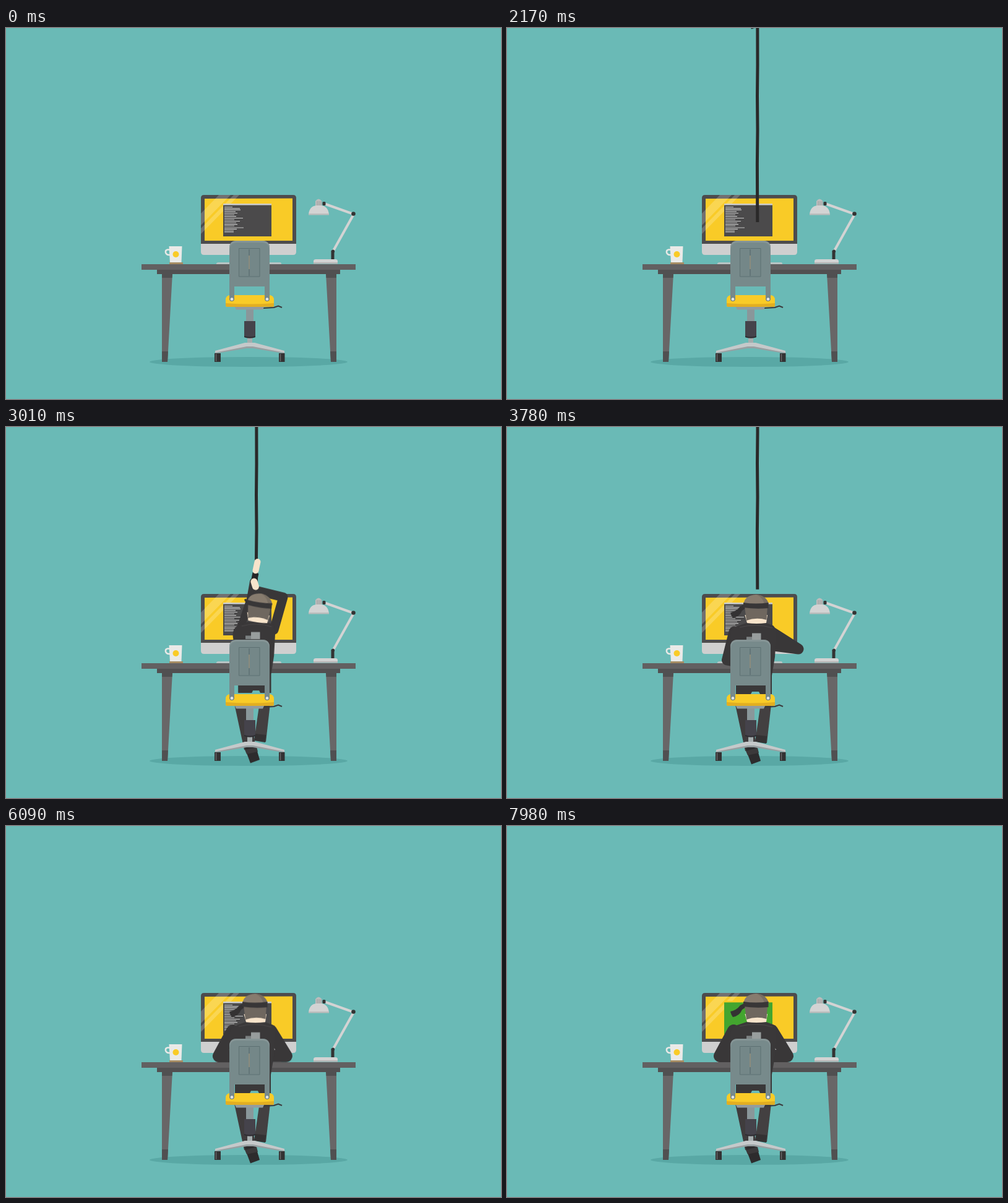
Write an HTML page without scripts that moves like this. It is 800 px wide and 600 px high and loops after 8000 ms.

```html
<!DOCTYPE html>
<html lang="en">
<head>
<meta charset="utf-8">
<title>Desk visitor</title>
<style>
html, body { margin: 0; width: 100%; height: 100%; overflow: hidden; background: #6abab6; }
svg { display: block; width: 100vw; height: 100vh; }

.rope, .ninja, .upper, .torso, .head, .tail, .arm, .hand, .cuff, .done { animation: 8s linear infinite; }
.limb { fill: none; stroke-linecap: round; stroke-linejoin: round; }
.arm { stroke: #393738; stroke-width: 20; }
.hand { stroke: #f8e4cb; }

.rope { animation-name: rope; transform-origin: 404px 0; }
@keyframes rope {
  0%, 6.3% { transform: translateY(-325px); animation-timing-function: cubic-bezier(.3, .2, .4, 1); }
  11% { transform: translateY(-80px) rotate(-1.8deg); animation-timing-function: ease-out; }
  14% { transform: translateY(-8px) rotate(.3deg); }
  17.5%, 45.5% { transform: none; animation-timing-function: ease-in; }
  50.75%, 100% { transform: translateY(-325px); }
}

.ninja { animation-name: drop; }
@keyframes drop {
  0%, 27% { transform: translateY(-560px); }
  27.125% { transform: translateY(-544px); animation-timing-function: cubic-bezier(.3, .1, .4, 1); }
  37.625% { transform: translateY(-2px); animation-timing-function: ease-out; }
  39.8% { transform: translateY(5px); animation-timing-function: ease-in-out; }
  43%, 100% { transform: none; }
}

.upper { animation-name: bob; }
@keyframes bob {
  0%, 54%, 59.5%, 65%, 70.5%, 77%, 83%, 89%, 94%, 98%, 100% { transform: none; }
  56.5%, 62%, 68%, 74%, 80%, 86%, 96.2% { transform: translateY(.8px); }
}

.torso { animation-name: torso; transform-origin: 434px 0; }
@keyframes torso {
  0%, 38% { transform: scaleX(.92); animation-timing-function: ease-in-out; }
  45%, 100% { transform: none; }
}

.head { animation-name: head; transform-origin: 403px 312px; }
@keyframes head {
  0%, 38.5% { transform: translate(4px, 0) rotate(8deg); animation-timing-function: ease-in-out; }
  45%, 100% { transform: none; }
}

.tail { animation-name: tail; transform-origin: 384px 289px; }
@keyframes tail {
  0%, 37.6% { transform: rotate(80deg) scale(.3); animation-timing-function: ease-out; }
  42.5% { transform: rotate(-12deg); }
  46%, 62%, 75%, 88%, 100% { transform: none; }
  56%, 69%, 82%, 94% { transform: rotate(2deg); }
}

.arm.right { animation-name: arm-right; }
@keyframes arm-right {
  0%, 38% { d: path("M433 330L448 277L407 267"); stroke-width: 15px; animation-timing-function: ease-in-out; }
  44.5% { d: path("M427 331L477 344L432 342"); stroke-width: 17px; }
  47.25% { d: path("M427 331L471 359L432 354"); stroke-width: 17px; animation-timing-function: ease-in-out; }
  52%, 57%, 62%, 67%, 72%, 77%, 82%, 87%, 91% { d: path("M428 331L452 372L430 372"); stroke-width: 20px; }
  54.5%, 59.5%, 64.5%, 69.5%, 74.5%, 79.5%, 84.5% { d: path("M428 331L454.5 371L431 371"); stroke-width: 20px; }
  93.6% { d: path("M428 331L462 366L434 365"); stroke-width: 19px; animation-timing-function: ease-in; }
  96%, 100% { d: path("M428 331L453 372L430 372"); stroke-width: 20px; }
}

.arm.left { animation-name: arm-left; }
@keyframes arm-left {
  0%, 38% { d: path("M378 330L395 280L400 252"); stroke-width: 12px; animation-timing-function: ease-in-out; }
  44% { d: path("M368 331L358 358L368 368"); stroke-width: 17px; }
  47.25% { d: path("M367 331L355.5 377L366 379"); stroke-width: 17px; animation-timing-function: ease-in-out; }
  52%, 56%, 61%, 66%, 71%, 76%, 81%, 86%, 90%, 100% { d: path("M366 331L344 372L364 372"); stroke-width: 20px; }
  53.5%, 58.5%, 63.5%, 68.5%, 73.5%, 78.5%, 83.5% { d: path("M366 331L343 371.5L364 371"); stroke-width: 20px; }
}

.hand.right { animation-name: hand-right; stroke-width: 11px; }
@keyframes hand-right {
  0%, 38% { d: path("M401 252L403.5 260"); animation-timing-function: ease-in-out; }
  44.5%, 100% { d: path("M412 362L408 366"); }
}
.hand.left { animation-name: hand-left; stroke-width: 10px; }
@keyframes hand-left {
  0%, 38% { d: path("M403.5 234L406.5 220"); animation-timing-function: ease-in-out; }
  44%, 100% { d: path("M378 372L386 374"); }
}
.cuff { stroke: #252425; stroke-width: 10px; stroke-linecap: butt; animation-name: cuff; }
@keyframes cuff {
  0%, 38% { d: path("M401.5 248L403.5 238"); animation-timing-function: ease-in-out; }
  44%, 100% { d: path("M372 370L378 372"); }
}

.done { animation-name: done; animation-timing-function: step-end; }
@keyframes done {
  0% { opacity: 0; }
  96.25%, 100% { opacity: 1; }
}
</style>
</head>
<body>
<svg viewBox="0 0 800 600">
  <rect width="800" height="600" fill="#6abab6"/>
  <ellipse cx="392" cy="540" rx="160" ry="8" fill="#59a8a5"/>

  <g id="monitor">
    <path d="M315 346H469V362Q469 367 464 367H320Q315 367 315 362Z" fill="#cfcfcf"/>
    <path d="M315 349V275Q315 270 320 270H464Q469 270 469 275V349Z" fill="#4d4c4d"/>
    <path d="M321 276L463 275.5V344H321Z" fill="#f9cb27"/>
    <path d="M344 270H363L315 319V300ZM368 270H377L315 333V324Z" fill="#fff" opacity=".2"/>
    <rect x="351" y="284" width="78" height="53" fill="#4b4a4b"/>
    <path d="M351 285.3H429" stroke="#d0d0cc" stroke-width="2.4"/>
    <path d="M353 289.5h13M353 291.8h25M353 294.2h26M353 296.9h18M353 299.5h21M353 302h16M353 304.6h19M353 307.5h30M353 310h16M353 312.5h25M353 315h19M353 317.6h21M353 320h16M353 323h31M353 325.4h20M353 328h15M353 330h15" stroke="#c4c4c4" stroke-width="1.2"/>
    <g class="done">
      <rect x="351" y="283" width="78" height="3" fill="#f9cb27"/>
      <rect x="351" y="285.3" width="78" height="51.7" fill="#43a52f"/>
    </g>
  </g>

  <g id="lamp" fill="#d3d3d3">
    <path d="M514 284L562 301L528 362" fill="none" stroke="#d3d3d3" stroke-width="4"/>
    <rect x="525.5" y="360" width="5" height="15" fill="#333"/>
    <circle cx="528.5" cy="361" r="2.6" fill="#333"/>
    <circle cx="561.5" cy="300.5" r="3.3" fill="#333"/>
    <path d="M500 290V280Q505 273 510.5 280V290Z" fill="#bdbdbd"/>
    <path d="M503 280V287M506 280V287M509 280V287" stroke="#999"/>
    <rect x="511.5" y="281" width="5" height="6" rx="1.5" fill="#333"/>
    <path d="M489 302Q490 288 502 287H510Q521 289 522 302Z"/>
    <path d="M489 300H522V302.5H489Z" fill="#bcbcbc"/>
    <path d="M497 381V377Q497 374 501 374H532Q536 374 536 377V381Z"/>
    <path d="M497 379H536V381.5H497Z" fill="#b5b5b5"/>
  </g>

  <g id="mug">
    <path d="M265 358.5H261Q257.5 359 258 363Q259 367.5 265 367" fill="none" stroke="#e9e9e7" stroke-width="2.6"/>
    <path d="M263.5 353H284.5L283.5 379H265Z" fill="#eaeae8"/>
    <circle cx="274.5" cy="366" r="5" fill="#f9cb27"/>
    <rect x="264" y="379" width="22" height="3" fill="#a68c63"/>
  </g>

  <g id="desk">
    <path d="M340 382V380.5Q341 379 343 379H443Q445 379 445 382Z" fill="#b9c4c4"/>
    <path d="M252 397H269L261 540H252ZM517 397H534V540H525Z" fill="#686667"/>
    <path d="M252 397H269L268.5 404H252ZM517 397H534V404H517.5ZM252 523H262L261 540H252ZM524 523H534V540H525Z" fill="#505051"/>
    <path d="M244 390H540V398H244Z" fill="#515051"/>
    <path d="M219 382H565V391H219Z" fill="#626061"/>
  </g>

  <path class="rope" d="M404.8 -20L405 60L404.5 110L405 165L404.4 220L404.8 314" fill="none" stroke="#2a2929" stroke-width="5"/>

  <g class="ninja">
    <g id="legs">
      <path d="M411 440H428L420 511L401 508Z" fill="#434041"/>
      <path d="M403 498L420 500L419 512L401 509Z" fill="#343233"/>
      <path d="M367 440H391L404 522L385 524Z" fill="#3f3c3d"/>
      <path d="M385 519L403 516L410 540L395 545.5Z" fill="#2d2c2d"/>
      <path d="M386 524L405 519L407 527L389 531Z" fill="#3b393a"/>
    </g>
    <g class="upper">
      <path class="limb arm left" d="M366 331L344 372L364 372"/>
      <path class="limb arm right" d="M428 331L452 372L430 372"/>
      <path class="limb cuff" d="M372 370L378 372"/>
      <path class="limb hand left" d="M378 372L386 374"/>
      <path class="limb hand right" d="M412 362L408 366"/>
      <g class="torso">
        <path d="M370 432V400L361 342Q359 329 369 323L387 317H419L430 321Q436 326 435 338L433 372L428 402V432H409L407 428H396L394 432Z" fill="#3a3839"/>
        <path d="M376 324Q403 317 429 325" fill="none" stroke="#4d4a4b"/>
      </g>
      <path d="M396 333.5H410.5V345H387V339.5H396Z" fill="#989d9d"/>
      <path d="M387 340H396V345H387Z" fill="#7c8283"/>
      <g class="head">
        <path d="M384.500 304H421L419 317Q403 319 388 317Z" fill="#f8e4cb"/>
        <path class="tail" d="M385 286L377 290Q371 298 361 300Q362 305 365 309Q376 307 380 297L386 293Z" fill="#343233"/>
        <path d="M384 290H421L419.5 312Q403 307 387 313Z" fill="#6f675f"/>
        <path d="M382 287Q384 272 403 271Q420 273 423 287Z" fill="#877b6e"/>
        <path d="M403 271Q420 273 423 287H416Q414 276 403 271Z" fill="#786e63"/>
        <path d="M382 284Q402 287 422.5 284V293Q402 295 382 292Z" fill="#383637"/>
      </g>
    </g>
  </g>

  <g id="chair">
    <path d="M388 455H400V476H388Z" fill="#89979a"/>
    <path d="M390 500H398V512H390Z" fill="#a5adae"/>
    <path d="M385 474H403V500Q394 503 385 500Z" fill="#45434b"/>
    <path d="M385 498Q394 501 403 498V500Q394 503 385 500Z" fill="#2e2d32"/>
    <path d="M338 522L386 509H402L450 522V526L399 516H389L338 526Z" fill="#c5c9ca"/>
    <path d="M338 525L389 515H399L450 525V526.5L399 518H389L338 526.5Z" fill="#98a0a2"/>
    <path d="M337 526H347V540H337ZM441 526H450.5V540H441Z" fill="#333233"/>
    <path d="M339.5 527V539M443.5 527V539" stroke="#68686a" stroke-width="1.5"/>
    <path d="M416 453L433 452L440 449.5L446 452" fill="none" stroke="#3b3a3c" stroke-width="2"/>
    <path d="M369 449H418L415 455.5H372Z" fill="#939c9e"/>
    <path d="M355 449V440Q355 432 363 432H425Q433 432 433 440V449Q433 451 429 451H359Q355 451 355 449Z" fill="#f9cb27"/>
    <path d="M355 445Q394 448 433 445V449Q433 451 429 451H359Q355 451 355 449Z" fill="#e2ae22"/>
    <path d="M361 356Q361 344 373 344H414Q426 344 426 356V438A4 4 0 0 1 418 438V418H369V438A4 4 0 0 1 361 438Z" fill="#778a8b"/>
    <path d="M361 356Q361 344 373 344H414Q426 344 426 356V360Q425 347 414 347H373Q362 347 361 360Z" fill="#869596"/>
    <path d="M376.5 356.5H410V402H376.5Z" fill="#748788" stroke="#5d7072"/>
    <path d="M393 358V401" stroke="#586b6d" stroke-width="1.2"/>
    <path d="M393 368V390" stroke="#b3a184"/>
    <g fill="#e1e4e4" stroke="#67777a">
      <circle cx="365" cy="438.5" r="3"/>
      <circle cx="422" cy="438.5" r="3"/>
    </g>
  </g>
</svg>
</body>
</html>
```
